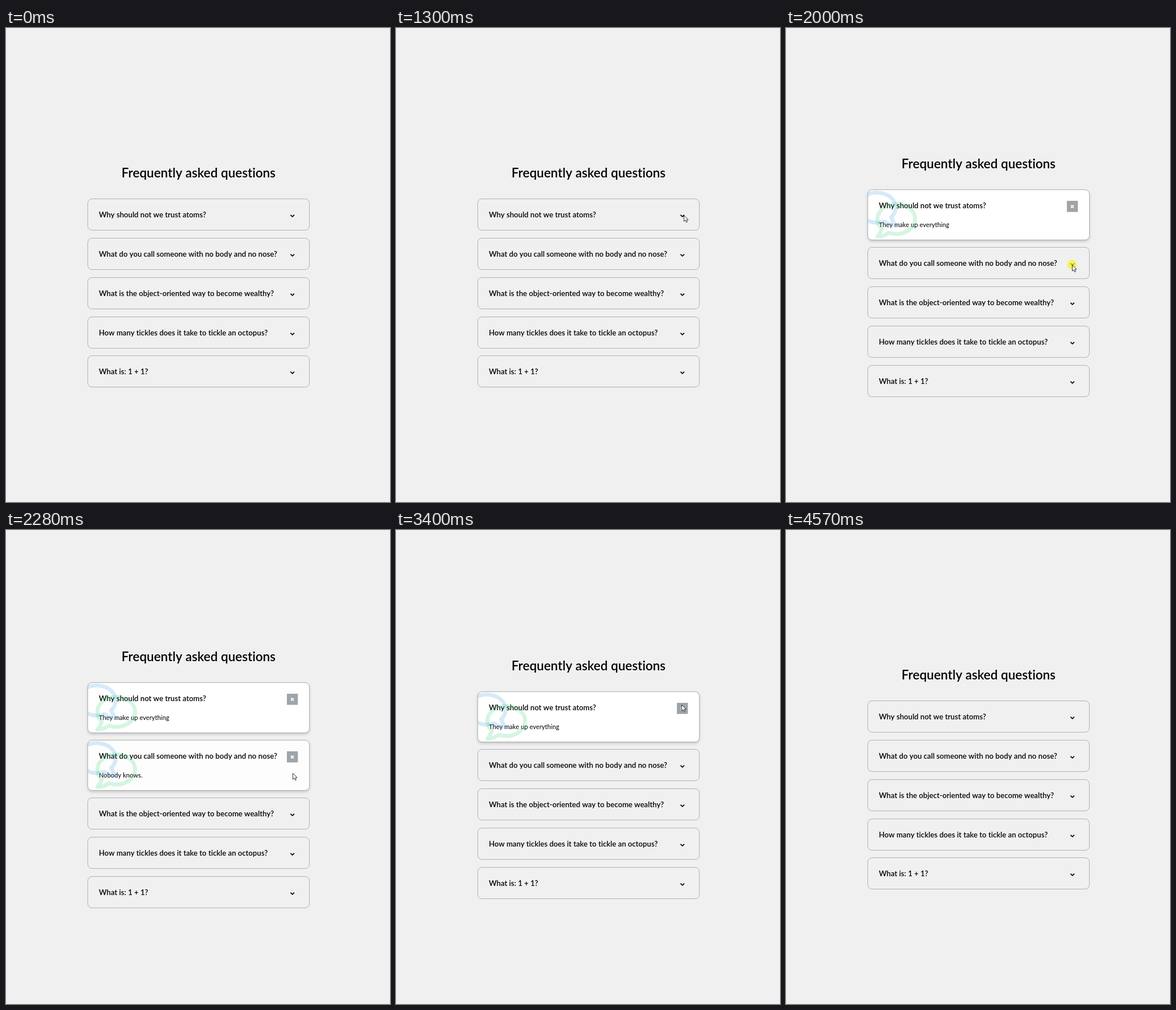
These frames come from a looping animation (674 px wide and 831 px high, 4.77 s). An HTML page with a canvas:

```html
<!DOCTYPE html>
<html lang="en">
<head>
<meta charset="utf-8">
<title>FAQ accordion</title>
<style>
  html, body { margin: 0; width: 100%; height: 100%; overflow: hidden; background: #f0f0f0; }
  canvas { display: block; }
</style>
</head>
<body>
<canvas id="stage" width="674" height="831"></canvas>
<script>
const ctx = document.getElementById('stage').getContext('2d');
const LOOP = 4770, STEP = 69.5, FADE = 300;
const FONT = 'Lato, "Open Sans", sans-serif';

const items = [
  { question: 'Why should not we trust atoms?', answer: 'They make up everything', open: 1435, close: 3655 },
  { question: 'What do you call someone with no body and no nose?', answer: 'Nobody knows.', open: 2060, close: 2890 },
  { question: 'What is the object-oriented way to become wealthy?' },
  { question: 'How many tickles does it take to tickle an octopus?' },
  { question: 'What is: 1 + 1?' },
];

// Pointer stops: time, x, y
const route = [
  [255, 651, 822], [680, 447, 306], [750, 455, 308], [1100, 511, 332], [1290, 505, 328],
  [1430, 505, 328], [1860, 502, 415], [2060, 502, 415], [2270, 503, 426], [2420, 503, 425],
  [2545, 498, 393], [2890, 498, 393], [3330, 501, 306], [3720, 501, 306],
  [3870, 515, 340], [4420, 667, 807], [4500, 670, 818],
];
const clicks = [[1365, 1435], [1990, 2060], [2820, 2890], [3585, 3655]];

const bubble = new Path2D('M80 360A232 184 0 1 1 166 410Q105 456 24 456Q60 415 80 360Z');
const arrow = new Path2D('M0 0V10.6L2.5 8.4L4.2 12.2L5.9 11.4L4.3 7.7H7.6Z');
const chevron = new Path2D('M-3.3-1.6L0 1.7L3.3-1.6');
const cross = new Path2D('M-2.4-2.4L2.4 2.4M2.4-2.4L-2.4 2.4');

const clamp = v => Math.min(1, Math.max(0, v));
const ease = v => 1 - (1 - v) ** 3;
const smooth = v => v * v * (3 - 2 * v);
const isOpen = (item, t) => t >= item.open && t < item.close;

function whiteness(item, t) {
  if (!(t >= item.open)) return 0;
  return t < item.close
    ? ease(clamp((t - item.open) / FADE))
    : 1 - smooth(clamp((t - item.close) / FADE));
}

function text(str, x, y, font, align = 'left') {
  ctx.font = `${font} ${FONT}`;
  ctx.letterSpacing = '0.02px'; // any spacing turns ligatures off
  ctx.textAlign = align;
  ctx.fillStyle = '#000';
  ctx.fillText(str, x, Math.round(y));
}

function strokeAt(path, x, y, color, width, scaleX = 1, scaleY = 1) {
  ctx.save();
  ctx.translate(x, y);
  ctx.scale(scaleX, scaleY);
  ctx.strokeStyle = color;
  ctx.lineWidth = width;
  ctx.stroke(path);
  ctx.restore();
}

function drawItem(item, y, height, t) {
  const open = isOpen(item, t), white = whiteness(item, t);
  const card = new Path2D();
  card.roundRect(143.5, y + 0.5, 389, height, 7.5);
  if (white) {
    ctx.save();
    ctx.shadowColor = 'rgba(0,0,0,.2)';
    ctx.shadowBlur = 5;
    ctx.shadowOffsetY = 2.5;
    ctx.fillStyle = `rgba(255,255,255,${white})`;
    ctx.fill(card);
    ctx.restore();
  }
  text(item.question, 163, y + 33, '600 13.1px');
  if (open) {
    text(item.answer, 163, y + 66, '400 11.15px');
    ctx.save();
    ctx.clip(card);
    ctx.globalAlpha = 0.2;
    strokeAt(bubble, 196, y - 2.5, '#3498db', 48, -0.1426, 0.1426);
    strokeAt(bubble, 157, y + 17.5, '#2ecc71', 48, 0.1426, 0.1426);
    ctx.restore();
    ctx.fillStyle = '#9fa4a8';
    ctx.fillRect(493, y + 20, 19.3, 19.5);
    strokeAt(cross, 502.5, y + 30, '#fff', 2);
  } else {
    strokeAt(chevron, 502.7, y + 30.2, '#000', 1.6);
  }
  ctx.strokeStyle = '#aeb1b3';
  ctx.lineWidth = 1;
  ctx.stroke(card);
}

function drawPointer(t) {
  if (t < 255 || t > 4560) return;
  let i = 0;
  while (i < route.length - 2 && t >= route[i + 1][0]) i++;
  const [t0, x0, y0] = route[i], [t1, x1, y1] = route[i + 1];
  const k = smooth(clamp((t - t0) / (t1 - t0)));
  const x = x0 + (x1 - x0) * k, y = y0 + (y1 - y0) * k;
  if (clicks.some(([from, to]) => t >= from && t < to)) {
    ctx.fillStyle = 'rgba(248,242,20,.65)';
    ctx.beginPath();
    ctx.arc(x, y, 8.5, 0, 7);
    ctx.fill();
  }
  ctx.save();
  ctx.translate(Math.round(x) + 0.5, Math.round(y) + 0.5);
  ctx.fillStyle = '#fff';
  ctx.fill(arrow);
  ctx.restore();
  strokeAt(arrow, Math.round(x) + 0.5, Math.round(y) + 0.5, '#222', 0.9);
}

function draw(now) {
  const t = Math.floor((now % LOOP - 255) / STEP) * STEP + 255;
  const openCount = items.filter(item => isOpen(item, t)).length;
  const shift = -16.2 * openCount;

  ctx.fillStyle = '#f0f0f0';
  ctx.fillRect(0, 0, 674, 831);
  ctx.lineJoin = 'round';
  text('Frequently asked questions', 338, 262 + shift, '600 22.4px', 'center');

  let y = 299.3 + shift;
  for (const item of items) {
    const extra = isOpen(item, t) ? 32.45 : 0;
    drawItem(item, Math.round(y), Math.round(55.3 + extra), t);
    y += 68.75 + extra;
  }
  drawPointer(t);
}

const start = performance.now();
function tick() {
  draw(performance.now() - start);
  requestAnimationFrame(tick);
}
tick();
</script>
</body>
</html>
```
